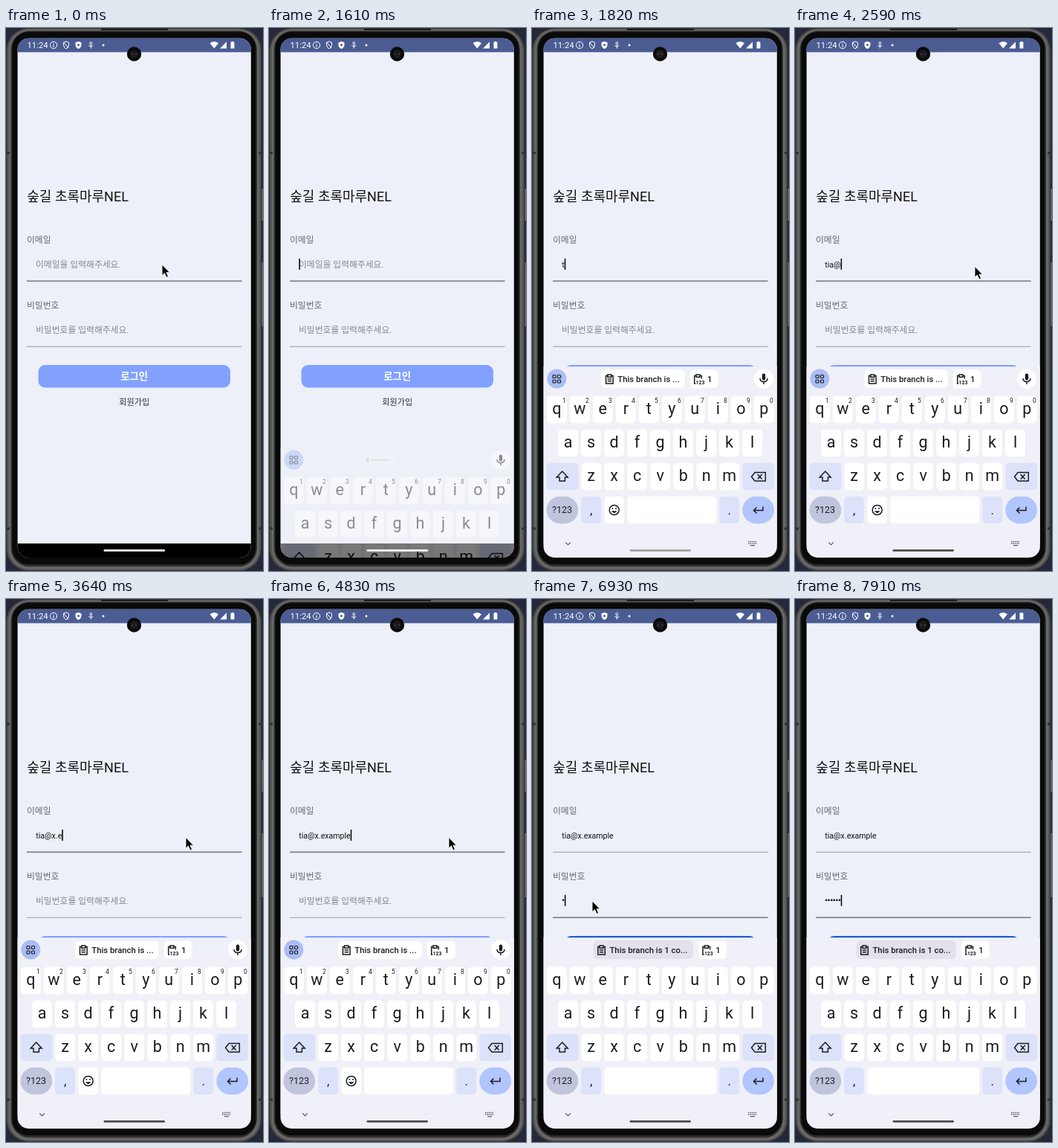
Recreate the animation shown at these times as an HTML page. Size 346 px wide and 730 px high, loop 8 s.

```html
<!DOCTYPE html>
<html lang="ko">
<head>
<meta charset="utf-8">
<title>Login</title>
<style>
  html, body { margin: 0; width: 100%; height: 100%; overflow: hidden; background: #25283a; }
  svg { display: block; font-family: Roboto, "Noto Sans CJK KR", sans-serif; }
  .mid { text-anchor: middle; }
  .line { fill: none; stroke: #1b1c21; stroke-width: 1.5; }
  .white { fill: none; stroke: #fff; stroke-width: 1; }
  .chip { font-size: 11.3px; font-weight: 500; }
</style>
</head>
<body>
<svg width="346" height="730" viewBox="0 0 346 730">
  <defs>
    <clipPath id="screen"><rect x="15.6" y="13.8" width="314.2" height="698.2" rx="15"/></clipPath>
  </defs>

  <!-- phone body -->
  <path d="M345 216V259M345 315V401" stroke="#6a6a6a" stroke-width="2"/>
  <rect width="344.5" height="730" rx="30" fill="#363636"/>
  <rect x="1.5" y="1" width="341.5" height="728" rx="29" fill="#575757"/>
  <rect x="4" y="2.3" width="336.5" height="725" rx="27" fill="#696969"/>
  <rect x="6.5" y="3.8" width="331.5" height="720.5" rx="25" fill="#303030"/>
  <rect x="8.3" y="5.3" width="328" height="716" rx="22" fill="#0a0a0a"/>
  <path d="M0 168H5M0 673H5M340 168H345M340 673H345" stroke="#303030" stroke-width="3"/>
  <path d="M128 2H218" stroke="#1c1c1c" stroke-width="2"/>

  <g clip-path="url(#screen)">
    <rect x="15" y="13" width="316" height="700" fill="#edf0f8"/>
    <rect x="15" y="13" width="316" height="19.5" fill="#4a5c92"/>
    <g fill="#fff">
      <text x="28.5" y="27" font-size="11.3">11:24</text>
      <circle class="white" cx="64" cy="23" r="4.6"/>
      <path class="white" d="M64 20V21.2M64 22.2V26"/>
      <path class="white" d="M77.5 19.5L81 18L84.5 19.5V23Q84 26.5 81 28Q78 26.5 77.5 23ZM77.5 19L84 27"/>
      <path d="M93.5 19.5L97.5 18L101.5 19.5V23Q101 26.5 97.5 28Q94 26.5 93.5 23Z"/>
      <circle cx="97.5" cy="22.7" r="1.5" fill="#4a5c92"/>
      <circle class="white" cx="114.3" cy="20.3" r="1.5"/>
      <path class="white" d="M111.3 23.5Q114.3 26.5 117.3 23.5M114.3 22V27.5"/>
      <circle cx="131" cy="23" r="1.5"/>
      <path d="M274.5 20.5Q280.3 16 286 20.5L280.3 27.5ZM288 27.5L297 18.5V27.5ZM302.5 19H303.7V18H306.2V19H307.4V27.5H302.5Z"/>
    </g>

    <text x="28.3" y="233" font-size="18" fill="#111">숲길 초록마루NEL</text>
    <g font-size="11.8">
      <text x="28" y="289.2" fill="#666970">이메일</text>
      <text x="28" y="377" fill="#666970">비밀번호</text>
      <text id="mailHint" x="40" y="322" fill="#85888f">이메일을 입력해주세요.</text>
      <text id="passHint" x="40" y="409.7" fill="#85888f">비밀번호를 입력해주세요.</text>
    </g>
    <g font-size="10.6" fill="#111">
      <text id="mail" x="40.3" y="321.7"></text>
      <text id="pass" x="40.3" y="409.2" stroke="#111" stroke-width=".4"></text>
    </g>
    <rect id="mailLine" x="28" width="289.5"/>
    <rect id="passLine" x="28" width="289.5"/>
    <rect id="button" x="43.5" y="453" width="258.5" height="30.5" rx="9"/>
    <text class="mid" x="172.7" y="473.3" font-size="13.4" font-weight="700" fill="#fff">로그인</text>
    <text class="mid" x="172.7" y="507.2" font-size="11.1" fill="#30323a">회원가입</text>
    <rect id="caret" width="1.5" height="15" fill="#000"/>

    <rect x="15" y="693" width="316" height="20" fill="#000"/>
    <g id="keyboard"></g>
    <rect id="handle" x="131.5" y="701" width="82.5" height="2.8" rx="1.4"/>
  </g>

  <circle cx="172.5" cy="35" r="9.7" fill="#0a0a0b"/>
  <circle cx="172.5" cy="35" r="5.5" fill="#1b1b1e"/>
  <path d="M169 35H171M174 35H176" stroke="#44454a" stroke-width="1.5"/>
  <path id="mouse" d="M0 0V14.7L3.4 11.6L6 17.3L8.5 16.2L6 10.7H10.5Z" fill="#000" stroke="#fff" stroke-width=".9"/>
</svg>

<script>
const $ = id => document.getElementById(id);
const set = (id, attrs) => { for (const k in attrs) $(id).setAttribute(k, attrs[k]); };
const show = (id, on) => set(id, { visibility: on ? 'visible' : 'hidden' });
const clamp = x => Math.max(0, Math.min(1, x));

const key = (x, y, w, fill = '#fff', r = 5) =>
  `<rect x="${x}" y="${y}" width="${w}" height="36.5" rx="${r}" fill="${fill}"/>`;
const label = (x, y, text, size = 21.5) =>
  `<text class="mid" x="${x}" y="${y}" font-size="${size}">${text}</text>`;
const line = d => `<path class="line" d="${d}"/>`;
const letters = (row, x, y) => [...row].map((c, i) =>
  key(x + i * 31 - 13.4, y, 26.8) + label(x + i * 31, y + 24.4, c)).join('');

const clipboard = (x, inner) => `<g transform="translate(${x} 466)">` +
  line('M3 1.5H.7V12H10.3V1.5H8M3 0H8V3.2H3Z') + inner + '</g>';
const chips = (id, x, w, text, x2) => `<g id="${id}">
  <g class="main"><rect class="back" x="${x}" y="459.3" width="${w}" height="24.7" rx="6" fill="#fff"/>
    ${clipboard(x + 5.5, line('M2.8 6H8.2M2.8 8.8H8.2'))}
    <text class="chip" x="${x + 22}" y="475.6">${text}</text></g>
  <g class="side"><rect x="${x2}" y="459.3" width="38" height="24.7" rx="6" fill="#fff"/>
    ${clipboard(x2 + 5.3, '<rect x="2.3" y="5.5" width="12" height="9" fill="#fff"/>' +
      '<text x="2.6" y="12.6" font-size="6.8" font-weight="700">123</text>')}
    <text class="chip" x="${x2 + 23.3}" y="475.6">1</text></g></g>`;

const grid = [28, 34.5].flatMap(x => [466.5, 473].map(y =>
  `<rect class="line" style="stroke-width:1.2" x="${x}" y="${y}" width="4" height="4" rx="1"/>`)).join('');
const digits = [...'1234567890'].map((d, i) => label(43.3 + i * 31, 504, d, 8.5)).join('');

$('keyboard').innerHTML = `<rect x="15" y="455.2" width="316" height="400" fill="#f0f0f8"/>
  <g fill="#1b1c21">
  ${letters('qwertyuiop', 33.3, 494.7)}${letters('asdfghjkl', 48.5, 539.7)}${letters('zxcvbnm', 79.7, 584.7)}
  ${key(19.7, 584.7, 42.7, '#dce2f9')}${line('M40.7 596L48.2 604H44.4V609H37V604H33.2Z')}
  ${key(283.3, 584.7, 42.7, '#dce2f9')}${line('M300 597.5H314.3V609H300L295.5 603.2ZM303.7 600L309.7 606.5M309.7 600L303.7 606.5')}
  ${key(19.5, 629.7, 42.7, '#c0c5dd', 18.2)}${label(40.5, 652.2, '?123', 12.5)}
  ${key(66.2, 629.7, 26.8, '#dce2f9')}${label(79.7, 653.5, ',', 17)}
  ${key(252.3, 629.7, 26.8, '#dce2f9')}${label(265.7, 653.5, '.', 17)}
  ${key(283.3, 629.7, 42.7, '#b1c5ff', 18.2)}${line('M311 643.5V648.5H298.5M302.5 644.5L298.5 648.5L302.5 652.5')}
  <g id="mailKeys">${digits}
    ${key(97.3, 629.7, 26.8)}${key(128.3, 629.7, 120)}
    <circle class="line" cx="110.7" cy="648" r="6.5"/><path d="M106.9 649.3H114.5Q110.7 655 106.9 649.3Z"/>
    <circle cx="108.4" cy="646" r="1"/><circle cx="113" cy="646" r="1"/>
    <circle cx="33.3" cy="471.5" r="13" fill="#a9bdf5"/>${grid}
    <circle cx="312" cy="471.5" r="13" fill="#fff"/>
    <rect x="309.8" y="464.5" width="4.4" height="9" rx="2.2"/>${line('M307 471Q307 475.5 312 475.5Q317 475.5 317 471M312 475.5V479')}
    ${chips('mailChips', 93.3, 112.5, 'This branch is ...', 212.7)}
  </g>
  <g id="passKeys">${key(97.3, 629.7, 151)}
    ${chips('passChips', 82.5, 134.5, 'This branch is 1 co...', 224)}</g>
  <g fill="none" stroke="#5c5d63"><path d="M45.2 691.5L48.5 694.8L51.8 691.5" stroke-width="1.2"/>
    <path d="M291 690.5H303M291 693H303" stroke-width="1.4" stroke-dasharray="1.4 1"/>
    <path d="M294 695.7H300" stroke-width="1.3"/></g>
  </g>`;

const LOOP = 8000, STEP = 70;
const address = 'tia@x.example';
const mailTimes = [1820, 1890, 2030, 2240, 3290, 3500, 3640, 3920, 3920, 4200, 4550, 4690, 4830];
const passTimes = [6930, 7070, 7210, 7350, 7490, 7910];
const blinkTimes = [280, 770, 1190, 2800, 3290, 5390, 5950, 6650, 6930];
const mouseStops = [[0, 1330, 210, 318], [2590, 5390, 242, 320.5], [6090, 7070, 81, 406]];

function draw(time) {
  const t = Math.floor(time / STEP) * STEP;
  const count = times => times.filter(x => x <= t).length;
  const typed = count(mailTimes), dots = count(passTimes);
  const onPass = t >= 6160, passLayout = t >= 6300;

  $('mail').textContent = address.slice(0, typed);
  $('pass').textContent = '•'.repeat(dots);
  show('mailHint', !typed);
  show('passHint', !dots);
  const underline = (id, y, focused) => set(id, {
    y: focused ? y - .9 : y - .5, height: focused ? 1.7 : 1, fill: focused ? '#7d828d' : '#989ca5' });
  underline('mailLine', 340.3, !onPass);
  underline('passLine', 428.3, onPass);
  set('button', { fill: dots ? '#1f5bd0' : '#82a1ff' });

  const field = $(onPass ? 'pass' : 'mail');
  const width = field.textContent ? field.getComputedTextLength() : 0;
  set('caret', { x: 40.3 + width, y: onPass ? 397.8 : 310 });
  show('caret', count(blinkTimes) % 2);

  const stop = mouseStops.find(([from, to]) => t >= from && t < to);
  show('mouse', stop);
  if (stop) set('mouse', { transform: `translate(${stop[2]} ${stop[3]})` });

  // Keyboard slides up while fading in; the handle darkens more slowly.
  const left = clamp((1750 - t) / 140);
  const gray = Math.round(255 - 178 * clamp((t - 1610) / 400));
  show('keyboard', t >= 1610);
  set('keyboard', { transform: `translate(0 ${109 * left ** 1.4})`, opacity: 1 - .53 * left });
  set('handle', { fill: `rgb(${gray} ${gray} ${gray})` });
  set('mailKeys', { display: passLayout ? 'none' : 'inline' });
  set('passKeys', { display: passLayout ? 'inline' : 'none' });
  const main = document.querySelector('#mailChips .main');
  const scale = 1 - .63 * left;
  main.setAttribute('transform', `translate(149 471.5) scale(${scale}) translate(-149 -471.5)`);
  main.setAttribute('opacity', 1 - .6 * left);
  document.querySelector('#mailChips .side').setAttribute('opacity', 1 - left);
  document.querySelector('#passChips .back').setAttribute('fill', dots ? '#e1e2ea' : '#fff');
}

const start = performance.now();
function tick() {
  draw((performance.now() - start) % LOOP);
  requestAnimationFrame(tick);
}
tick();
</script>
</body>
</html>
```
